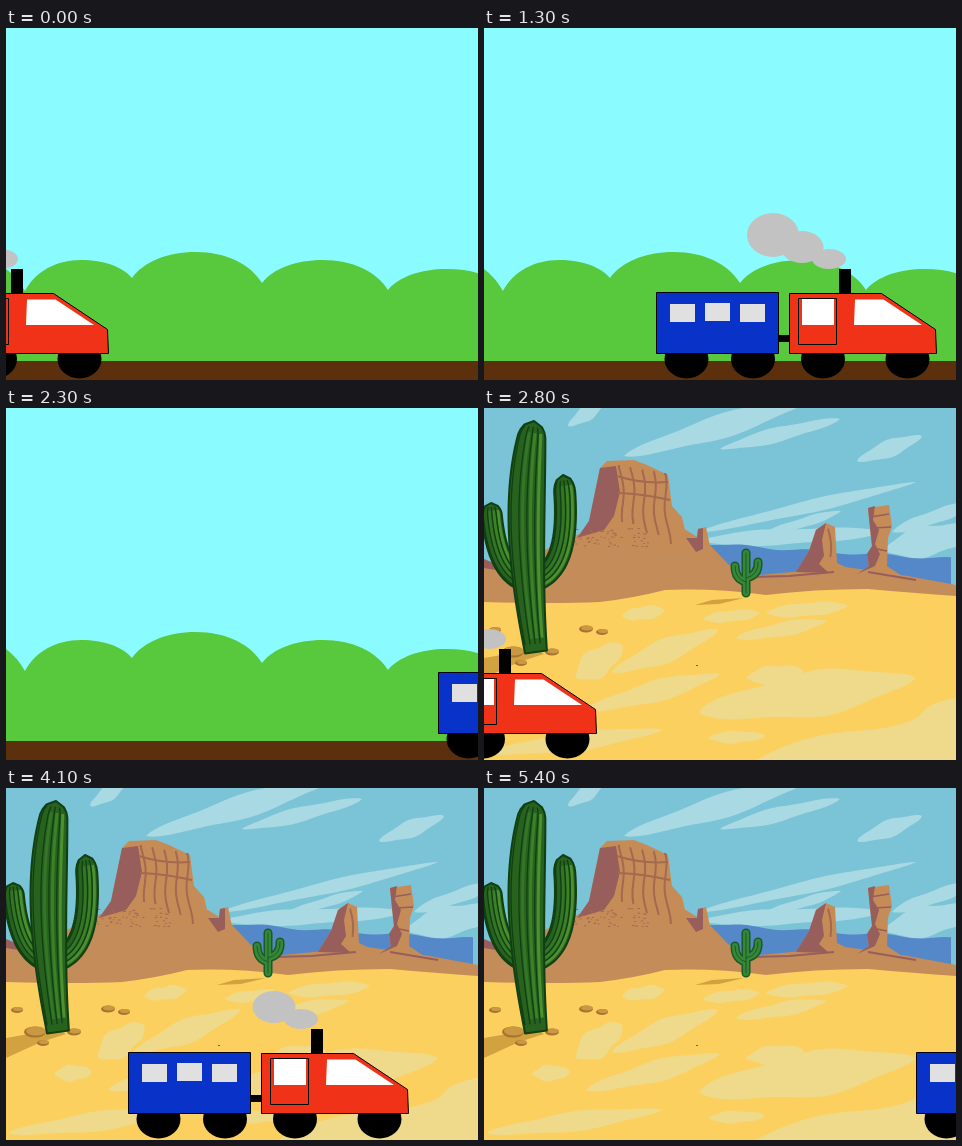
Recreate the animation shown at these times as an HTML page with a canvas. Size 472 px wide and 352 px high, loop 5.5 s.

```html
<!DOCTYPE html>
<html lang="en">
<head>
<meta charset="utf-8">
<title>Train ride</title>
<style>
html, body { margin: 0; width: 100%; height: 100%; overflow: hidden; }
canvas { display: block; }
</style>
</head>
<body>
<canvas id="stage" width="472" height="352"></canvas>
<script>
const W = 472, H = 352, LOOP = 5500, STEP = 100, DESERT_START = 2400;
const { sin, sqrt, min, PI } = Math;
const stage = document.getElementById('stage');
let ctx;

function rect(color, x, y, w, h) {
  ctx.fillStyle = color;
  ctx.fillRect(x, y, w, h);
}

function oval(color, x, y, rx, ry) {
  ctx.fillStyle = color;
  ctx.beginPath();
  ctx.ellipse(x, y, rx, ry, 0, 0, PI * 2);
  ctx.fill();
}

function line(color, width, d) {
  ctx.strokeStyle = color;
  ctx.lineWidth = width;
  ctx.stroke(new Path2D(d));
}

function shape(color, d, outline, width = 1) {
  ctx.fillStyle = color;
  ctx.fill(new Path2D(d));
  if (outline) line(outline, width, d);
}

// Quadratic curve with a varying half width; side -1..1 runs across it
function ribbon(x0, y0, cx, cy, x1, y1, half) {
  return (u, side) => {
    const v = 1 - u;
    const dx = v * (cx - x0) + u * (x1 - cx), dy = v * (cy - y0) + u * (y1 - cy);
    const k = side * half(u) / Math.hypot(dx, dy);
    return [v * v * x0 + 2 * v * u * cx + u * u * x1 - dy * k,
            v * v * y0 + 2 * v * u * cy + u * u * y1 + dx * k];
  };
}

function trace(at, side, from = 0, to = 1, steps = 40) {
  return Array.from({ length: steps + 1 }, (_, i) => at(from + (to - from) * i / steps, side)).join('L');
}

function fillRibbon(color, at, outline, width) {
  shape(color, `M${trace(at, -1)}L${trace(at, 1, 1, 0)}Z`, outline, width);
}

function streak(color, x0, y0, x1, y1, half) {
  const profile = u => half * Math.max(0, sin(PI * u)) ** 0.65 * (1 + 0.14 * sin(11 * u + x0));
  fillRibbon(color, ribbon(x0, y0, (x0 + x1) / 2, (y0 + y1) / 2, x1, y1, profile));
}

// Alternating valleys and crests
const RIDGE = [[19, 263], [75, 232], [126, 250], [190, 224], [256, 255],
  [317, 232], [382, 262], [441, 241], [500, 262]];

function drawHills() {
  rect('#8afcff', 0, 0, W, H);
  let d = 'M0 241Q11 249 19 263';
  RIDGE.slice(1).forEach(([x, y], i) => {
    const [px, py] = RIDGE[i];
    const mix = (a, b) => [px + (x - px) * a, py + (y - py) * b];
    d += i % 2 ? `C${mix(0.45, 0)} ${mix(0.82, 0.38)} ${x},${y}`
               : `C${mix(0.18, 0.62)} ${mix(0.55, 1)} ${x},${y}`;
  });
  shape('#58c83c', d + 'V334H0Z');
  rect('#5c300c', 0, 333, W, 19);
}

function drawSky() {
  rect('#7bc3d6', 0, 0, W, 200);
  [
    [84, 18, 122, -8, 7], [140, 48, 330, -10, 11], [236, 41, 356, 11, 7],
    [373, 53, 438, 28, 8], [215, 124, 432, 74, 6], [276, 128, 357, 103, 5],
    [408, 124, 490, 95, 7], [212, 133, 400, 124, 8], [400, 142, 495, 122, 15]
  ].forEach(cloud => streak('#a9d9e3', ...cloud));
  let d = 'M215 190';
  for (let x = 215; x <= W; x += 6) d += `L${x} ${134 + 17 * ((x - 215) / 257) ** 0.8 + 1.5 * sin(x / 11)}`;
  shape('#5488c8', d + 'V190Z');
}

function drawRocks() {
  const clay = '#c38c58', shade = '#985e5c', lit = '#c68c58', crack = '#a4694f';
  const fissure = (x, y0, y1, width = 2) => {
    let d = `M${x} ${y0}`;
    for (let y = y0; y < y1; y += 7) d += `L${x + (y - y0) / 14 + 2 * sin(y + x)} ${y}`;
    line(crack, width, d);
  };
  shape(clay, 'M0 156L48 148L95 126L202 122L226 137L244 156L266 168L318 163L352 158L384 162L424 168L472 177V200H0Z');
  shape(shade, 'M0 151L36 166L0 160Z');

  // Mesa with its shaded left face
  shape(lit, 'M94 130L105 113L116 60L123 53L150 52L163 57L184 67L188 98L198 109L202 126L212 142L150 146Z');
  shape(shade, 'M93 130L105 113L116 60L132 58L136 84L130 108L120 122Z');
  for (let i = 0; i < 5; i++) fissure(136 + i * 11, 58 + i * 2, 118 + i * 5);
  line(crack, 2, 'M133 68Q158 76 184 74M134 85Q160 86 186 92');
  shape(lit, 'M210 145L214 121L222 119L226 138L236 152Z');
  shape(shade, 'M202 130L213 130L214 121L219 120L219 141L212 144Z');

  // Smaller butte and pillar
  shape(lit, 'M312 164L325 143L332 122L342 115L351 119L353 155L376 166Z');
  shape(shade, 'M312 164L325 143L332 122L342 115L338 132L340 148L335 156L345 165Z');
  fissure(344, 121, 156);
  shape(lit, 'M373 166L385 158L383 146L388 138L386 120L384 100L405 97L408 118L404 130L403 158L418 168Z');
  shape(shade, 'M373 166L385 158L383 146L388 138L386 120L384 100L391 98L389 112L395 122L391 136L396 146L391 158Z');
  line(shade, 1.5, 'M386 109L405 106M390 120L407 119M388 140L403 143');

  let seed = 11;
  const random = () => (seed = seed * 16807 % 2147483647) / 2147483647;
  for (let i = 0; i < 65; i++) rect(crack, 88 + random() * 75, 120 + random() * 18, 1 + random() * 2, 1);
  line(shade, 2, 'M268 169L305 168L350 164M384 164L432 172');
}

function drawSand() {
  shape('#fbd05e', 'M0 194Q70 196 116 194Q150 190 181 182Q230 180 282 187Q330 181 384 181Q430 185 472 188V352H0Z');
  const pale = '#eeda8a';
  [
    [92, 270, 138, 237, 14], [128, 264, 234, 222, 11], [252, 230, 343, 213, 7],
    [102, 302, 236, 266, 10], [215, 304, 432, 270, 21], [2, 345, 178, 322, 9],
    [138, 208, 181, 202, 7], [219, 211, 276, 205, 6], [282, 205, 364, 198, 7],
    [48, 286, 86, 284, 8], [262, 270, 320, 263, 9], [224, 330, 281, 328, 6]
  ].forEach(patch => streak(pale, ...patch));
  shape(pale, 'M272 352Q315 328 360 324Q425 320 437 306Q445 294 472 290V352Z');
  shape('#d1a23f', 'M0 250L52 241L60 246L35 254L0 270ZM211 197L228 192L260 190L235 196Z');
  [[29, 244, 11], [68, 244, 7], [11, 222, 6], [102, 221, 7], [118, 224, 6], [37, 255, 6]]
    .forEach(([x, y, r]) => {
      oval('#a87330', x, y, r, r / 2);
      oval('#c99843', x + 1, y - 1, r - 1, r / 2 - 1);
    });
  rect('#80602c', 212, 257, 2, 1);
}

function cactusLimb(at) {
  const dark = '#103f12';
  fillRibbon('#28621f', at, dark, 2);
  for (let i = 0; i < 4; i++) {
    const side = 0.66 - i * 0.44;
    line(['#28621f', '#347526', '#3c8028', '#4c9030'][i], 3, 'M' + trace(at, side, 0.06, 0.95));
    line(dark, 1.3, 'M' + trace(at, side + 0.2, 0.03, 0.97));
  }
}

function drawCacti() {
  const cap = (u, length) => sqrt(1 - (1 - min(1, u / length)) ** 2);
  cactusLimb(ribbon(7, 95, 10, 160, 38, 172, u => 10 * cap(u, 0.1)));
  cactusLimb(ribbon(79, 67, 90, 158, 52, 172, u => 10.5 * cap(u, 0.1)));
  cactusLimb(ribbon(50, 13, 34, 110, 52, 244, u => (11 + 7 * sin(PI * u ** 0.8)) * cap(u, 0.08)));

  ctx.lineCap = 'round';
  const arms = 'M262 145V185M251 158Q251 171 262 174M274 154Q275 167 262 170';
  line('#1b5a24', 9, arms);
  line('#348838', 6, arms);
  line('#1b5a24', 1, arms);
  ctx.lineCap = 'butt';
}

function drawDesert() {
  drawSky();
  drawRocks();
  drawSand();
  drawCacti();
}

// The train is laid out with its nose at x = 452
function drawTrain(nose, puffs) {
  ctx.save();
  ctx.translate(nose - 452, 0);
  for (let i = 0; i < puffs; i++) {
    oval('#c2c2c2', 345 - 26 * i - i * i, 231 - 12 * i, 17 + 4.5 * i, 10 + 6 * i);
  }
  [202.5, 269, 339, 423.5].forEach(x => oval('#000', x, 331, 22, 19.5));
  rect('#000', 294, 307, 12, 7);
  shape('#0832c8', 'M172.5 264.5H294.5V325.5H172.5Z', '#000');
  for (let i = 0; i < 3; i++) rect('#e0e0e0', 186 + 35 * i, 276 - i % 2, 25, 18);
  rect('#000', 355, 241, 12, 24);
  shape('#f03218', 'M305.5 265.5H397.5L451.5 301.5L452.5 325.5H305.5Z', '#000');
  line('#000', 1, 'M314.5 270.5H352.5V316.5H314.5Z');
  rect('#fff', 318, 271, 32, 26);
  shape('#fff', 'M371 271.5H399.5L438 297H370Z');
  ctx.restore();
}

// [time, nose x]
const HILL_RIDE = [[0, 102], [600, 272], [1200, 412], [1300, 452], [1900, 612], [2300, 712]];
const DESERT_RIDE = [[2400, 12], [3600, 312], [4200, 422], [4500, 502], [5400, 712]];

function noseAt(ride, t) {
  const i = Math.max(1, ride.findIndex(key => key[0] >= t));
  const [t0, x0] = ride[i - 1], [t1, x1] = ride[i];
  const x = x0 + (x1 - x0) * (t - t0) / (t1 - t0);
  return Math.round((x - 2) / 10) * 10 + 2;
}

function puffsAt(t, second, third, reset) {
  return t < second || t >= reset ? 1 : t < third ? 2 : 3;
}

function backdrop(draw) {
  const layer = document.createElement('canvas');
  layer.width = W;
  layer.height = H;
  ctx = layer.getContext('2d');
  ctx.lineJoin = 'round';
  draw();
  return layer;
}

const hills = backdrop(drawHills);
const desert = backdrop(drawDesert);
ctx = stage.getContext('2d');
const start = performance.now();

function frame() {
  const elapsed = Math.max(0, performance.now() - start) % LOOP;
  const t = Math.floor(elapsed / STEP) * STEP;
  const inDesert = t >= DESERT_START;
  ctx.drawImage(inDesert ? desert : hills, 0, 0);
  drawTrain(
    noseAt(inDesert ? DESERT_RIDE : HILL_RIDE, t),
    inDesert ? puffsAt(t, 3800, 4200, 5000) : puffsAt(t, 500, 1000, 1800)
  );
  requestAnimationFrame(frame);
}
frame();
</script>
</body>
</html>
```
